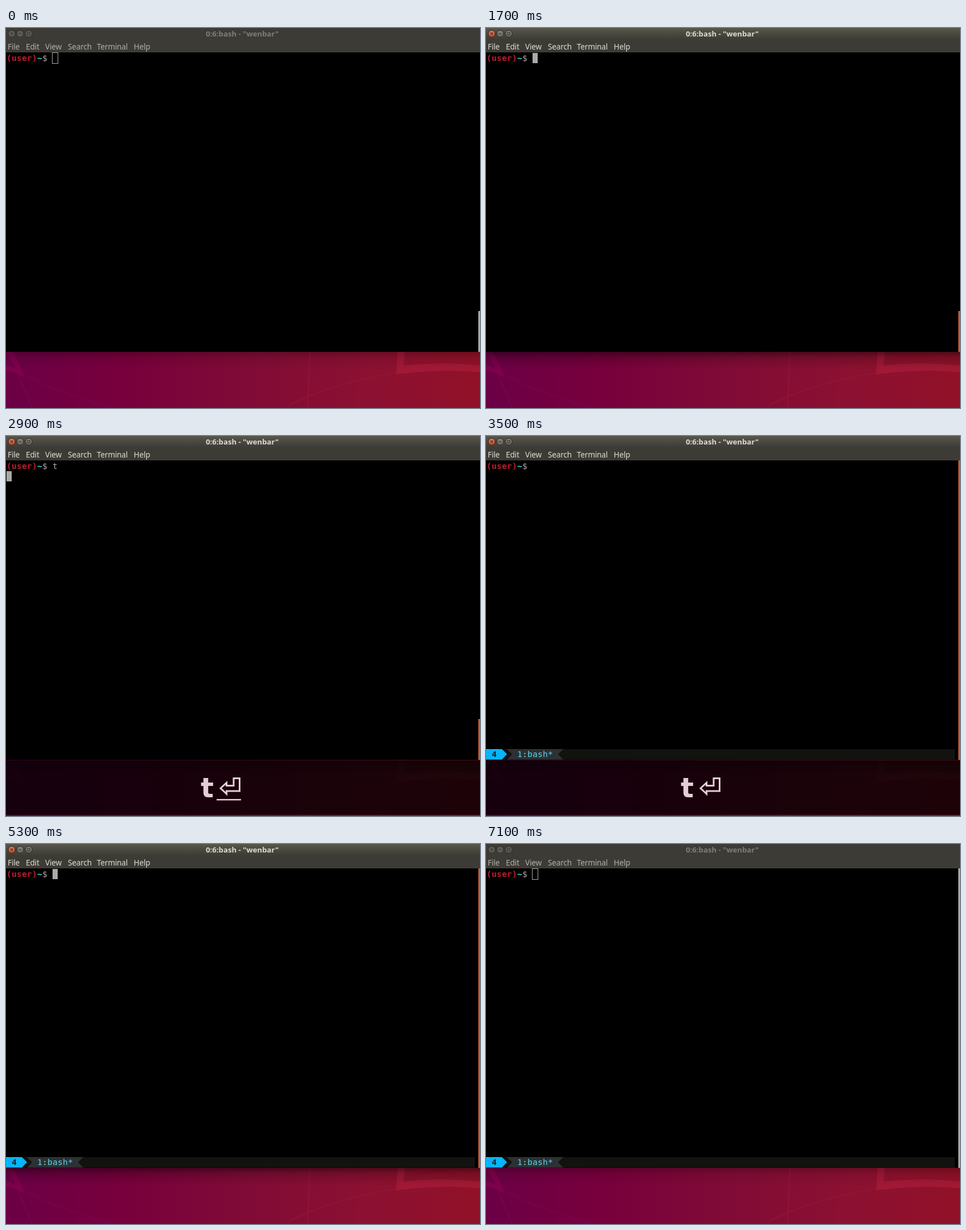
An HTML page that plays this animation: 835x670 px, repeating every 7.2 s.

```html
<!DOCTYPE html>
<html lang="en">
<head>
<meta charset="utf-8">
<title>Terminal</title>
<style>
  html, body { margin: 0; width: 100%; height: 100%; overflow: hidden; background: #000; }
  svg { display: block; width: 835px; height: 670px; }
  text { white-space: pre; }
  .ui { font: 13.6px "Noto Sans", "Open Sans", sans-serif; letter-spacing: -.15px; }
  .title { font: bold 13.2px "Noto Sans", "Open Sans", sans-serif; }
  .mono { font: 14.67px "DejaVu Sans Mono", monospace; letter-spacing: .17px; }
  .bold { font-weight: bold; }
  .key { font: bold 48px "DejaVu Sans", sans-serif; }
</style>
</head>
<body>
<svg viewBox="0 0 835 670">
  <defs>
    <linearGradient id="wall">
      <stop offset="0" stop-color="#6b0046"/>
      <stop offset=".25" stop-color="#78003c"/>
      <stop offset=".5" stop-color="#800b36"/>
      <stop offset=".75" stop-color="#8b1032"/>
      <stop offset="1" stop-color="#911127"/>
    </linearGradient>
    <linearGradient id="shade" x2="0" y2="1">
      <stop offset="0" stop-opacity=".45"/>
      <stop offset=".35" stop-opacity=".16"/>
      <stop offset="1" stop-opacity="0"/>
    </linearGradient>
    <linearGradient id="bar" x2="0" y2="1">
      <stop offset="0" stop-color="#58574b"/>
      <stop offset="1" stop-color="#3d3c36"/>
    </linearGradient>
    <linearGradient id="close" x2="0" y2="1">
      <stop offset="0" stop-color="#f0744f"/>
      <stop offset="1" stop-color="#d9481f"/>
    </linearGradient>
    <linearGradient id="knob" x2="0" y2="1">
      <stop offset="0" stop-color="#87857b"/>
      <stop offset="1" stop-color="#66645b"/>
    </linearGradient>
  </defs>

  <!-- desktop -->
  <rect y="571" width="835" height="99" fill="url(#wall)"/>
  <g fill="none">
    <path d="M0 571H13L34 616L0 602V594L17 600Z" fill="#850050" opacity=".75"/>
    <path d="M22 612L46 670M36 614Q110 650 190 670" stroke="#7d0450" stroke-width="3" opacity=".5"/>
    <path d="M536 571L531 670" stroke="#a01a3c" stroke-width="4" opacity=".3"/>
    <path d="M500 664Q590 622 690 608" stroke="#a01a3c" stroke-width="3" opacity=".3"/>
    <path d="M690 571H703L700 595Q770 588 835 595V607Q765 600 687 611Z" fill="#a41a38" opacity=".85"/>
  </g>
  <rect id="shadow" y="571" width="835" height="31" fill="url(#shade)"/>

  <!-- window -->
  <rect width="835" height="43" fill="#3c3b35"/>
  <rect id="glow" width="835" height="20" fill="url(#bar)"/>
  <rect y="43" width="835" height="528"/>
  <g id="buttons"></g>
  <text id="caption" class="title" x="352" y="15">0:6:bash - "wenbar"</text>
  <g id="menu" class="ui"></g>

  <!-- shell -->
  <g id="prompt" class="mono">
    <text class="bold" x="1" y="58" fill="#c01c28">(user)</text>
    <text class="bold" x="55" y="58" fill="#34d8d8">~</text>
    <text x="64" y="58" fill="#aaaaa6">$</text>
  </g>
  <text id="typed" class="mono" x="82" y="58" fill="#aaaaa6">t</text>
  <rect id="block" width="9" height="18" fill="#aaaaa6"/>
  <rect id="hollow" x="81.5" y="43.5" width="10" height="19" fill="none" stroke="#aaaaa6"/>

  <g id="status">
    <rect y="552" width="826" height="18.5" fill="#12120f"/>
    <path d="M37 552H136L127 561L136 570.5H37L46 561Z" fill="#2d3134"/>
    <path d="M0 552H28L37 561L28 570.5H0Z" fill="#08b4fa"/>
    <text class="mono bold" x="10" y="566" fill="#12222c">4</text>
    <text class="mono" x="55" y="566" fill="#5fd3e6">1:bash*</text>
  </g>
  <rect id="scroll" x="832" width="3"/>

  <!-- key display -->
  <g id="keys" opacity=".8">
    <rect y="572" width="835" height="96"/>
    <text id="letter" class="key" y="637" fill="#fff">t</text>
    <path id="enter" d="M378 621L388.500 611.500V616.500H401V603.500H411.500V626H388.500V631Z" fill="none" stroke="#fff" stroke-width="3"/>
    <rect id="under" y="640" height="2.500" fill="#fff"/>
  </g>
</svg>
<script>
const LOOP = 7200;
const $ = id => document.getElementById(id);
const set = (id, attrs) => {
  for (const k in attrs) $(id).setAttribute(k, attrs[k]);
};
const show = (id, on) => set(id, { display: on ? 'inline' : 'none' });
const within = (t, from, to) => t >= from && t < to;

// blends two colours given as [r, g, b]
const mix = (a, b, k) => `rgb(${a.map((v, i) => Math.round(v + (b[i] - v) * k))})`;

const marks = ['M-2.200 -2.200L2.200 2.200M2.200 -2.200L-2.200 2.200', 'M-2.800 0H2.800', 'M-2.200 -2.200H2.200V2.200H-2.200Z'];
$('buttons').innerHTML = marks.map((d, i) => `
  <g transform="translate(${10 + 15 * i} 10)">
    <circle r="6" fill="#5d5c54" stroke="#2e2d29"/>
    <circle class="lit" r="6" fill="url(#${i ? 'knob' : 'close'})" stroke="#2e2d29"/>
    <path d="${d}" fill="none" stroke="#383731" stroke-width="1.100"/>
  </g>`).join('') +
  '<circle id="hover" cx="40" cy="10" r="5.500" fill="#fff" opacity=".22"/>';

const items = { File: 4, Edit: 36, View: 70, Search: 110, Terminal: 161, Help: 226 };
$('menu').innerHTML = Object.entries(items)
  .map(([word, x]) => `<text x="${x - 1}" y="38">${word}</text>`).join('');

const focusAt = t =>
  t < 500 ? 0 : t < 600 ? .5 : t < 7000 ? 1 : t < 7100 ? .5 : 0;

const offTimes = [[1100, 1700], [2500, 2900], [3500, 4400], [4700, 5300], [5900, 6500]];

function cursorAt(t) {
  if (within(t, 1800, 2900)) return { x: 91, y: 44 };
  if (within(t, 2900, 3000)) return { x: 1, y: 62 };
  if (within(t, 3000, 3200)) return { x: 1, y: 44 };
  return { x: 82, y: 44 };
}

function drawWindow(t) {
  const k = focusAt(t);
  set('shadow', { opacity: .55 + .45 * k });
  set('glow', { opacity: k });
  set('caption', { fill: mix([128, 125, 117], [223, 219, 210], k) });
  set('menu', { fill: mix([178, 174, 166], [223, 219, 210], k) });
  document.querySelectorAll('.lit').forEach(c => c.setAttribute('opacity', k));
  show('hover', within(t, 6200, 6300));

  const top = t < 3000 ? 499 : 43;
  set('scroll', { y: top, height: 571 - top, fill: mix([170, 169, 164], [190, 92, 54], k) });
}

function drawShell(t) {
  const active = within(t, 500, 7000);
  show('prompt', !within(t, 3000, 3200));
  show('typed', within(t, 1800, 3000));
  show('status', t >= 3100);
  show('hollow', !active);
  show('block', active && !offTimes.some(([a, b]) => within(t, a, b)));
  set('block', cursorAt(t));
}

function drawKeys(t) {
  const entered = t >= 2900;
  show('keys', within(t, 1800, 4400));
  show('enter', entered);
  show('under', within(t, 1800, 2000) || within(t, 2900, 3100));
  set('letter', { x: entered ? 343 : 367 });
  set('under', entered ? { x: 371, width: 43 } : { x: 367, width: 23 });
}

function render(t) {
  drawWindow(t);
  drawShell(t);
  drawKeys(t);
}

const start = performance.now();
function tick(now) {
  render(Math.max(0, now - start) % LOOP);
  requestAnimationFrame(tick);
}
render(0);
requestAnimationFrame(tick);
</script>
</body>
</html>
```
